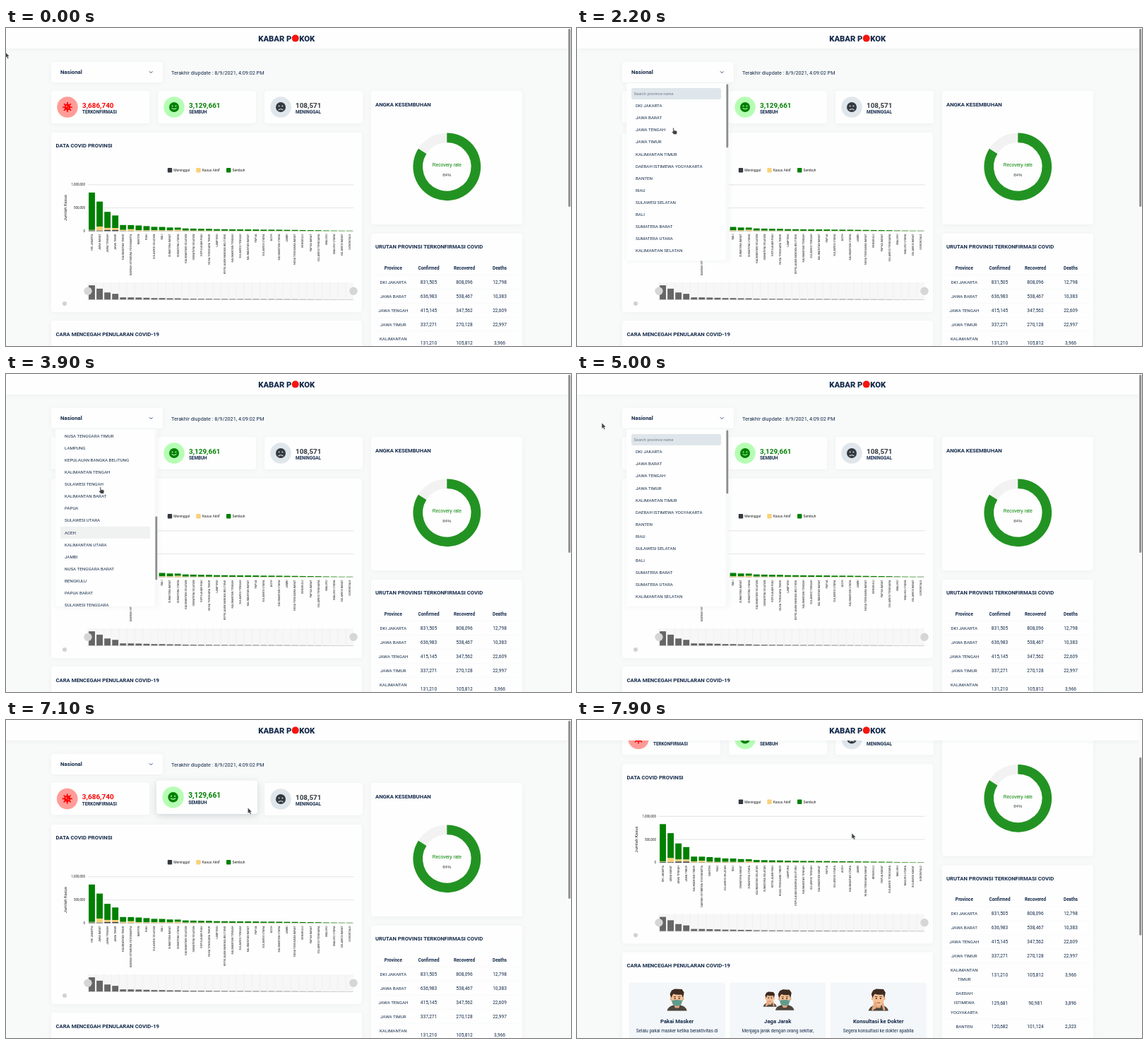
An HTML page for the animation above (8000 ms loop, 800x450 px).

```html
<!DOCTYPE html>
<html lang="id">
<head>
<meta charset="utf-8">
<style>
html, body { margin: 0; width: 100%; height: 100%; overflow: hidden; background: #f8faf9; }
svg { display: block; }
text { font-family: Roboto, "Open Sans", sans-serif; fill: #14294b; white-space: pre; }
.plain { font-family: "Liberation Sans", Arial, sans-serif; }
.card { fill: #fdfefd; filter: drop-shadow(0 1px 3px rgba(30, 60, 80, .05)); }
</style>
</head>
<body>
<svg id="stage" width="800" height="450" viewBox="0 0 800 450"></svg>
<script>
const provinces = `DKI JAKARTA,JAWA BARAT,JAWA TENGAH,JAWA TIMUR,KALIMANTAN TIMUR,DAERAH ISTIMEWA YOGYAKARTA,BANTEN,RIAU,SULAWESI SELATAN,BALI,SUMATERA BARAT,SUMATERA UTARA,KALIMANTAN SELATAN,SUMATERA SELATAN,KEPULAUAN RIAU,NUSA TENGGARA TIMUR,LAMPUNG,KEPULAUAN BANGKA BELITUNG,KALIMANTAN TENGAH,SULAWESI TENGAH,KALIMANTAN BARAT,PAPUA,SULAWESI UTARA,ACEH,KALIMANTAN UTARA,JAMBI,NUSA TENGGARA BARAT,BENGKULU,PAPUA BARAT,SULAWESI TENGGARA,MALUKU,MALUKU UTARA,SULAWESI BARAT,GORONTALO`.split(',');
// Cases in thousands
const totals = [832, 637, 415, 337, 131, 130, 121, 108, 92, 90, 78, 76, 58, 54, 50, 49, 42,
  41, 38, 37, 36, 35, 31, 31, 30, 27, 25, 22, 21, 19, 14, 12, 10, 10];
const active = [11, 88, 45, 44, 21, 35, 17, 13, 15, 14, 13, 24];
const deaths = [13, 10, 23, 23, 4, 4, 2];
const NAVY = '#14294b', GREEN = '#008000';

// Markup helpers; text is centred vertically on y
const rect = (x, y, w, h, fill, r = 0, more = '') =>
  `<rect x="${x}" y="${y}" width="${w}" height="${h}" rx="${r}" fill="${fill}" ${more}/>`;
const card = (x, y, w, h) => rect(x, y, w, h, '#fdfefd', 4, 'class="card"');
const circle = (x, y, r, fill, more = '') => `<circle cx="${x}" cy="${y}" r="${r}" fill="${fill}" ${more}/>`;
const path = (d, stroke, w, fill = 'none') =>
  `<path d="${d}" stroke="${stroke}" stroke-width="${w}" fill="${fill}" stroke-linecap="round"/>`;
const text = (x, y, s, size, { bold = 400, fill = NAVY, anchor = 'start', more = '' } = {}) =>
  `<text x="${x}" y="${y + size * .355}" font-size="${size}" font-weight="${bold}" text-anchor="${anchor}" style="fill:${fill}" ${more}>${s}</text>`;
const middle = { anchor: 'middle' };
const title = (x, y, s) => text(x, y, s, 7.68, { bold: 700 });

function virus(x, y) {
  let s = circle(x, y, 4.4, 'red');
  for (let i = 0; i < 8; i++) {
    const a = i * Math.PI / 4, c = Math.cos(a), n = Math.sin(a);
    s += path(`M${x} ${y}L${x + 6.3 * c} ${y + 6.3 * n}`, 'red', 1.7);
  }
  return s + circle(x - 1.3, y - 1, 1.1, '#ff9c98') + circle(x + 1.4, y + 1, .7, '#ff9c98');
}

const face = (x, y, fill, hole, mouth) => circle(x, y, 7, fill) +
  circle(x - 2.4, y - 1.6, .95, hole) + circle(x + 2.4, y - 1.6, .95, hole) +
  path(`M${x - 3} ${y + 2.8 - mouth}q3 ${2 * mouth} 6 0`, hole, 1.1);

function statCard(i, value, label, color, disc, icon) {
  const x = 64 + 151 * i;
  return `<g id="stat${i}">${card(x, 89, 139, 46)}${circle(x + 23, 112, 14.7, disc)}${icon}` +
    text(x + 44, 109, value, 9.9, { bold: 700, fill: color }) +
    text(x + 44, 119.2, label, 6.3, { bold: 700 }) + '</g>';
}

function chart() {
  let s = card(64, 148, 440, 254) + title(70.5, 166.5, 'DATA COVID PROVINSI');
  [['Meninggal', 228.8, '#343a40'], ['Kasus Aktif', 269.3, '#fad07a'], ['Sembuh', 312, GREEN]]
    .forEach(([label, x, fill]) => s += rect(x, 198, 6.4, 6.4, fill, 1) + text(x + 8.5, 201.5, label, 4.9, { fill: '#222' }));
  ['1,000,000', '500,000', '0'].forEach((label, i) => {
    const y = 221.8 + i * 32.8;
    s += path(`M116 ${y}H492`, '#dcdedd', .8) + text(112, y, label, 4.5, { fill: '#222', anchor: 'end' });
  });
  s += text(84, 254.5, 'Jumlah Kasus', 5.9, { ...middle, fill: '#222', more: 'transform="rotate(-90 84 254.5)"' });
  s += rect(116, 360, 376, 25, '#f6f7f6');
  const step = 376 / 34, scale = 65.6 / 1000, base = 287.4;
  provinces.forEach((name, i) => {
    const x = 116 + i * step, total = totals[i];
    const dead = (deaths[i] ?? total * .03) * scale;
    const act = (active[i] ?? total * .15) * scale;
    const bar = (y, h, fill) => rect(x + step * .1, y, step * .8, h, fill);
    s += bar(base - total * scale, total * scale - dead - act, GREEN) +
      bar(base - dead - act, act, '#fad07a') + bar(base - dead, dead, '#343a40');
    const cx = x + step / 2;
    s += text(cx, 291.5, name, 3.85, { fill: '#222', anchor: 'end', more: `transform="rotate(-90 ${cx} 291.5)"` });
    s += path(`M${x} 360V385`, '#ebeceb', .6) + bar(384.4 - total / 41, total / 41, '#666');
  });
  s += path('M116 384.5H492', '#ccc', .5);
  return s + circle(116, 372.3, 5.7, '#d5d6d5') + circle(492, 372.3, 5.7, '#d5d6d5') + circle(83, 390, 3, '#d0d2d1');
}

function donut() {
  const a = .84 * 2 * Math.PI, r = 41.1, cx = 624.3, cy = 196.3;
  return card(517, 89, 214, 189) + title(523, 108, 'ANGKA KESEMBUHAN') +
    circle(cx, cy, r, 'none', 'stroke="#f2f2f2" stroke-width="13.6"') +
    `<path d="M${cx} ${cy - r}A${r} ${r} 0 1 1 ${cx + r * Math.sin(a)} ${cy - r * Math.cos(a)}" fill="none" stroke="#229322" stroke-width="13.6"/>` +
    text(cx, 193.8, 'Recovery rate', 6.6, { ...middle, fill: GREEN, more: 'class="plain"' }) +
    text(cx, 207.5, '84%', 6, { ...middle, fill: '#373d3f', more: 'class="plain"' });
}

function table() {
  let s = card(517, 291, 214, 300) + title(523, 309.5, 'URUTAN PROVINSI TERKONFIRMASI COVID');
  const cols = [548.3, 598.5, 649, 699];
  ['Province', 'Confirmed', 'Recovered', 'Deaths'].forEach((h, i) => s += text(cols[i], 339.3, h, 6.35, { ...middle, bold: 700 }));
  const rows = [
    [359.5, 'DKI JAKARTA', '831,505', '808,096', '12,798'],
    [379.5, 'JAWA BARAT', '636,983', '538,467', '10,383'],
    [399.5, 'JAWA TENGAH', '415,145', '347,562', '22,609'],
    [419.5, 'JAWA TIMUR', '337,271', '270,128', '22,997'],
    [446, 'KALIMANTAN|TIMUR', '131,210', '105,812', '3,966'],
    [485.7, 'DAERAH|ISTIMEWA|YOGYAKARTA', '129,681', '90,981', '3,896'],
    [519, 'BANTEN', '120,682', '101,124', '2,323']];
  rows.forEach(([y, name, ...nums]) => {
    const lines = name.split('|'), half = (lines.length - 1) * 6.6;
    s += path(`M523 ${y - half - 10}H725`, '#f5f7f7', .6);
    lines.forEach((l, i) => s += text(cols[0], y - half + i * 13.2, l, 6.2, middle));
    nums.forEach((n, i) => s += text(cols[i + 1], y, n, 6.55, middle));
  });
  return s;
}

function person(x, y, k, mask) {
  return `<g transform="translate(${x} ${y}) scale(${k})">` +
    path('M-14 15Q-13 9 -5 7H5Q13 9 14 15Z', 'none', 0, '#4d453c') +
    rect(-3.5, 4, 7, 7, '#e4a67c', 2) +
    circle(-8, -2, 2, '#f2b78c') + circle(8, -2, 2, '#f2b78c') +
    rect(-7.7, -12, 15.4, 20, '#f5bf94', 7) +
    path('M-8.5 -3L-10 -9L-7.5 -14L-3 -16L7 -15.5L10 -11L8.5 -3L6.5 -8Q-1 -7 -5 -9L-6.5 -7Z', 'none', 0, '#3e2b22') +
    path('M-4.5 -5h2.6M2 -5h2.6', '#3e2b22', .8) +
    circle(-3, -2.5, 1, '#33261f') + circle(3, -2.5, 1, '#33261f') +
    (mask ? path('M-7.3 .5Q0 -1.5 7.3 .5L6 6Q0 10.5 -6 6Z', 'none', 0, '#5d9c8d') + path('M-7 1.5L-8.5 -1M7 1.5L8.5 -1', '#5d9c8d', .8)
          : path('M-2 4q2 -1.5 4 0', '#8f4d38', 1) + path('M-8 13L-5 4M-5 11L-3 4M8 13L6 5', '#e8aa7e', 3)) + '</g>';
}

function tips() {
  let s = card(64, 414, 440, 180) + title(70.5, 433, 'CARA MENCEGAH PENULARAN COVID-19');
  [['Pakai Masker', 'Selalu pakai masker ketika beraktivitas di'],
   ['Jaga Jarak', 'Menjaga jarak dengan orang sekitar,'],
   ['Konsultasi ke Dokter', 'Segera konsultasi ke dokter apabila']].forEach(([head, line], i) => {
    const x = 141.6 + 142.6 * i;
    s += rect(x - 68, 457, 136, 120, '#f4f7f9', 3) +
      text(x, 512, head, 7.7, { ...middle, bold: 700 }) + text(x, 525.4, line, 6.35, middle);
    s += i === 1 ? person(x - 11, 481, .68, false) + person(x + 10, 482, .95, true) : person(x, 482, 1, i === 0);
  });
  return s;
}

function dropdown() {
  const list = provinces.map((n, i) => text(83, 110 + i * 17.1, n, 6.2)).join('');
  return `<g id="menu">${rect(70, 78, 145, 251, '#fdfefd', 2, 'class="card"')}
    <svg x="70" y="78" width="145" height="251" viewBox="70 78 145 251"><g id="list">
    ${rect(77, 85, 127, 16, '#dfe6eb', 3)}${text(80.5, 93.3, 'Search province name', 5.7, { fill: '#6f7b86' })}
    ${rect(77, 494.8, 127, 17, '#f0f1f1', 1, 'id="hover"')}${list}</g>
    ${rect(210.5, 78, 4.5, 251, '#f7f8f8')}${rect(211.4, 79.5, 2.8, 90, '#8c8c8c', 1.4, 'id="listThumb"')}</svg></g>`;
}

const stage = document.getElementById('stage');
stage.innerHTML = `${rect(0, 0, 800, 450, '#f8faf9')}
  <g id="page">
    ${card(64, 48, 158, 29)}${text(77, 62.7, 'Nasional', 7.8, { bold: 700 })}
    ${path('M203.2 61.6l2 2 2-2', '#2c4a78', 1)}
    ${text(234, 63.8, 'Terakhir diupdate : 8/9/2021, 4:09:02 PM', 7.25)}
    ${chart()}${donut()}${table()}${tips()}
    ${statCard(0, '3,686,740', 'TERKONFIRMASI', 'red', '#ff9c98', virus(87, 112))}
    ${statCard(2, '108,571', 'MENINGGAL', '#343a40', '#dfe6ec', face(389, 112, '#343a40', '#dfe6ec', -1))}
    ${statCard(1, '3,129,661', 'SEMBUH', GREEN, '#b6fdb4', face(238, 112, GREEN, '#b6fdb4', 1.2))}
    ${dropdown()}
  </g>
  ${rect(0, 0, 800, 29, '#fdfefd', 0, 'class="card"')}
  ${text(404.3, 15, 'KABAR P', 11.2, { bold: 900, anchor: 'end' })}${circle(409.7, 14.6, 5, '#f5160f')}
  ${text(415.2, 15, 'KOK', 11.2, { bold: 900 })}
  ${rect(795.5, 0, 4.5, 450, '#f9fafa')}${rect(796.2, 1, 3, 252, '#8e8e8e', 1.5, 'id="thumb"')}
  <g id="cursor">
    <path id="arrow" d="M0 0V8.4L2 6.7L3.3 9.6L4.9 8.9L3.6 6.1H6Z" fill="#3f4244" stroke="#fff" stroke-width=".5"/>
    <path id="hand" d="M1 .8Q2 0 2.6 1V4L6 4.6Q7.2 5 7 6.4L6.4 9.8H2.2L-.6 6.4Q0 5.2 1.2 6Z" fill="#3f4244" stroke="#fff" stroke-width=".5"/>
  </g>`;

const $ = id => document.getElementById(id);
const set = (id, name, value) => $(id).setAttribute(name, value);
const ramp = (t, a, b) => { const u = Math.min(1, Math.max(0, (t - a) / (b - a))); return u * u * (3 - 2 * u); };
function track(keys, t, col = 1) {
  let i = 0;
  while (i < keys.length - 2 && t >= keys[i + 1][0]) i++;
  const [a, b] = [keys[i], keys[i + 1]];
  return a[col] + (b[col] - a[col]) * ramp(t, a[0], b[0]);
}

const pointer = [[0, -1, 34], [300, 1, 35], [900, 78, 39], [1400, 159, 59], [1800, 159, 60], [2300, 132, 150],
  [3100, 132, 153], [3800, 132, 159.5], [4500, 132, 159.5], [4900, 35, 69], [5100, 35, 69], [5400, 95, 66],
  [5600, 125, 62], [6200, 125, 62], [6500, 120, 112], [6900, 215, 122], [7100, 342.3, 124], [7200, 388, 159], [8000, 389, 160]];
const listScroll = [[2200, 0], [3100, 183.5], [3500, 350], [3650, 350], [3900, 279], [4450, 0]];

function lift(i, k) {
  const cx = 133.5 + 151 * i;
  set('stat' + i, 'transform', `translate(${cx} ${112 - 2.7 * k}) scale(${1 + .03 * k}) translate(${-cx} -112)`);
  $('stat' + i).style.filter = k ? `drop-shadow(0 ${3 * k}px ${5 * k}px rgba(30,50,70,${.14 * k}))` : '';
}

function draw(now) {
  const t = now % 8000;
  const scroll = 85.5 * ramp(t, 7400, 7850);
  set('page', 'transform', `translate(0 ${-scroll})`);
  set('thumb', 'y', 1 + scroll * .605);

  set('menu', 'opacity', ramp(t, 1570, 1800) * (1 - ramp(t, 5600, 5800)));
  const offset = track(listScroll, t);
  set('list', 'transform', `translate(0 ${-offset})`);
  set('listThumb', 'y', 79.5 + offset * .437);
  set('hover', 'opacity', +(t >= 3500 && t < 4100));

  lift(0, ramp(t, 6350, 6600) * (1 - ramp(t, 6850, 7200)));
  lift(1, ramp(t, 6850, 7100) * (1 - ramp(t, 7150, 7450)));

  const hand = t >= 1150 && t < 4620 || t >= 5380 && t < 6280;
  set('cursor', 'transform', `translate(${track(pointer, t)} ${track(pointer, t, 2)})`);
  set('hand', 'opacity', +hand);
  set('arrow', 'opacity', +!hand);
  requestAnimationFrame(draw);
}
requestAnimationFrame(draw);
</script>
</body>
</html>
```
